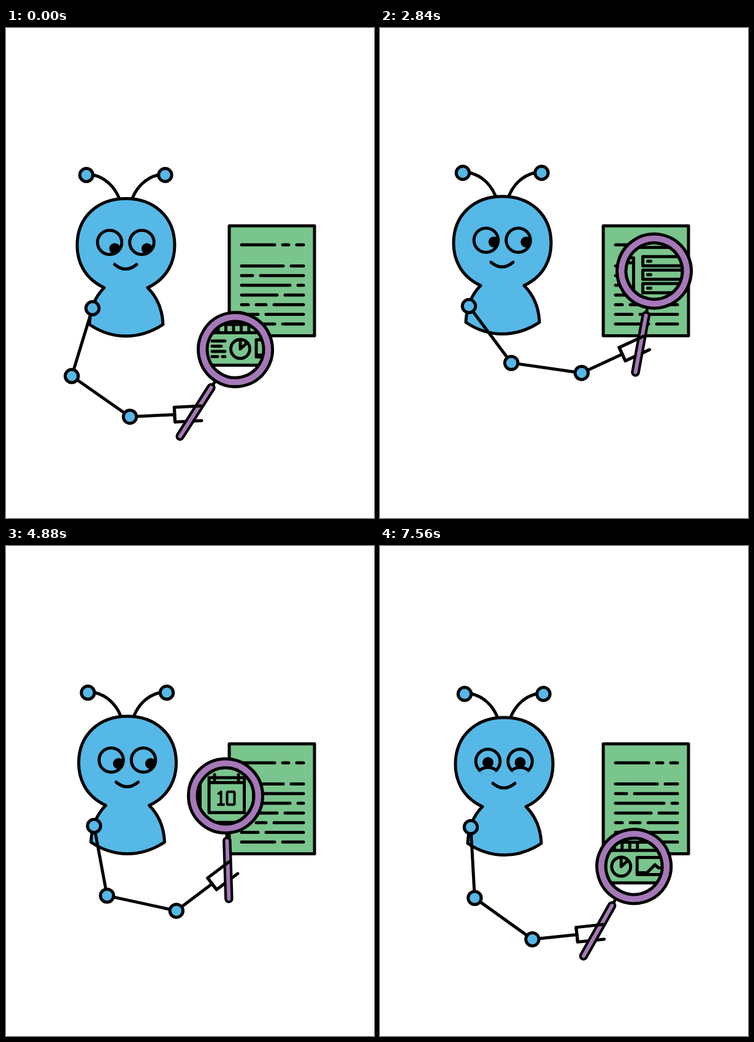
Recreate the animation shown at these times as an HTML page. Size 600 by 800 pixels, loop 7600 ms.

```html
<!DOCTYPE html>
<html lang="en">
<head>
<meta charset="utf-8">
<title>Reading with a magnifier</title>
<style>
  html, body { margin: 0; width: 100%; height: 100%; overflow: hidden; background: #fff; }
  svg { display: block; width: 100vw; height: 100vh; }
  .ink { fill: none; stroke: #000; stroke-width: 5; stroke-linecap: round; stroke-linejoin: round; }
  .blue { fill: #55b8e7; }
  .green { fill: #7ac58d; }
  .purple { stroke: #a678b9; }
  .dot { fill: #000; stroke: none; }
</style>
</head>
<body>
<svg viewBox="0 0 600 800">
  <defs>
    <clipPath id="lensClip"><circle id="lensHole" r="46"/></clipPath>
    <clipPath id="eyeClip"><circle r="22.4"/></clipPath>
  </defs>

  <g class="ink">
    <rect class="green" x="364" y="323" width="139" height="179.5"/>
    <path id="textLines"/>
  </g>

  <g id="body" class="ink">
    <path d="M184 277C177 260 163 245 143 240M206.500 277C213.500 260 227.500 245 247.500 240"/>
    <circle class="blue" cx="131" cy="240" r="10.700"/>
    <circle class="blue" cx="259.500" cy="240" r="10.700"/>
    <path class="blue" d="M160 424C126 408 116 379 116 355C116 308 150 278.500 195.500 278.500C241 278.500 275 308 275 355C275 379 265 408 231 424C246 439 255 460 256 484Q227 503 195.500 503Q164 503 136 484C137 460 145 439 160 424Z"/>
    <path d="M177 386Q195 401 213 386"/>
    <g class="eye" transform="translate(169 350)"></g>
    <g class="eye" transform="translate(221.500 350)"></g>
  </g>

  <g class="ink">
    <path id="arm"/>
    <circle id="shoulder" class="blue" r="10.700"/>
    <circle id="elbow" class="blue" r="10.700"/>
  </g>

  <circle id="lensBack" r="46" fill="#fff"/>
  <g clip-path="url(#lensClip)">
    <g id="details" class="ink">
      <rect class="green" x="321" y="346" width="163" height="204.500"/>
      <!-- profile card -->
      <path d="M335 356H473V394H335ZM370 356V394M387 375H458M346 379Q353 387 360 379"/>
      <circle class="dot" cx="349" cy="372" r="3.300"/>
      <circle class="dot" cx="357" cy="372" r="3.300"/>
      <!-- calendar -->
      <path d="M335.500 411H393V468H335.500ZM335.500 419H393M344.500 406V415M383.500 406V415"/>
      <path stroke-width="4" d="M351 437L355 434V455M350.500 455H359.500"/>
      <rect stroke-width="4" x="365" y="434" width="12" height="21" rx="2"/>
      <path id="servers"/>
      <path id="strip" d="M335 484H473M335 497.500H473"/>
      <!-- list, pie, chart -->
      <path d="M336 511H357M336 519.500H351M336 528H357M336 536.500H345M353 536.500H357"/>
      <circle cx="382" cy="524" r="15.500"/>
      <path d="M382 509V524L392 515"/>
      <path d="M408 509H473V537H408ZM409 534H424L437 521L443 526H460L471 515"/>
    </g>
  </g>

  <g id="glass" class="ink">
    <path class="hand" d="M-105.500 0H-32.500M-32.500 -12V12H11"/>
    <circle class="purple" r="53.200" stroke-width="10"/>
    <circle r="60.500"/>
    <circle r="46"/>
    <path d="M0 62V74"/>
    <path stroke-width="14.500" d="M0 73.500V168"/>
    <path class="purple" stroke-width="6" d="M0 73.500V168"/>
    <path class="hand" d="M-32.500 12V-12H11"/>
    <circle id="wrist" class="blue" r="10.700"/>
  </g>
</svg>

<script>
const LOOP = 7600;
const MOVE = 440, DRIFT = 0.04;                  // quick moves after a slow creep
const BONE = 115.8, GRIP = 124, REACH = 105.5, HAND_TILT = -35.3;
const PARALLAX = 0.28, GAZE = 13.2;
const $ = id => document.getElementById(id);
const all = name => document.querySelectorAll("." + name);
const rad = deg => deg * Math.PI / 180;
const mix = (a, b, u) => a + (b - a) * u;
const smooth = (from, to, t) => {
  const u = Math.min(1, Math.max(0, (t - from) / (to - from)));
  return u * u * (3 - 2 * u);
};

// Where the glass stops and how far the body leans there
const start = { x: 374, y: 525, tilt: 32.5, leanX: 0, leanY: 0 };
const stops = [
  { at: 0, ...start },
  { at: 400, ...start, x: 400 },
  { at: 800, ...start },
  { at: 1560, x: 444.5, y: 515, tilt: 33.3, leanX: 3, leanY: 0 },
  { at: 2280, x: 449.6, y: 399, tilt: 11, leanX: 4, leanY: -3.5 },
  { at: 3600, x: 348.5, y: 317, tilt: -10.1, leanX: 3, leanY: -4.5 },
  { at: 4600, x: 357.3, y: 406.6, tilt: -2.2, leanX: 2.5, leanY: -0.5 },
  { at: 6020, x: 419, y: 526, tilt: 30.5, leanX: 6.7, leanY: 1.2 },
  { at: LOOP, x: 414, y: 523, tilt: 29.3, leanX: 7, leanY: 1.5 }
];

function poseAt(t) {
  const i = stops.findIndex(s => s.at > t);
  const a = stops[i - 1], b = stops[i];
  const leave = Math.max(a.at, b.at - MOVE);
  const creep = leave > a.at ? DRIFT * Math.min(1, (t - a.at) / (leave - a.at)) : 0;
  const u = mix(creep, 1, smooth(leave, b.at, t));
  const pose = {};
  for (const key in start) pose[key] = mix(a[key], b[key], u);
  return pose;
}

// Rows of text are one ruled width broken by equal gaps
const gaps = [[438, 461], [452], [402], [463], [442], [395, 424], [411], [438]];
$("textLines").setAttribute("d", gaps.map((row, i) => {
  const y = i ? 372.7 + 15.8 * i : 354;
  return `M384 ${y}` + row.map(x => `H${x}M${x + 13} ${y}`).join("") + "H485";
}).join(""));

$("servers").setAttribute("d", [0, 1, 2].map(i => {
  const y = 409 + 22 * i;
  return `M408 ${y}H473V${y + 15}H408ZM416 ${y + 7.5}H421`;
}).join(""));

let strip = $("strip").getAttribute("d");
for (let x = 346; x < 410; x += 12.5) strip += `M${x} 484V497`;
$("strip").setAttribute("d", strip);

for (const eye of all("eye"))
  eye.innerHTML = `<circle class="blue" r="19.8"/>
    <g clip-path="url(#eyeClip)">
      <circle class="pupil dot" r="9"/>
      <circle class="lid blue" r="22"/>
    </g>`;

for (const hand of all("hand"))
  hand.setAttribute("transform", `translate(0 ${GRIP}) rotate(${HAND_TILT})`);

const wrist = {
  x: -REACH * Math.cos(rad(HAND_TILT)),
  y: GRIP - REACH * Math.sin(rad(HAND_TILT))
};

const move = (el, x, y) => el.setAttribute("transform", `translate(${x} ${y})`);
move($("wrist"), wrist.x, wrist.y);

function drawArm(sx, sy, wx, wy) {
  // Two equal bones: the elbow sits on the perpendicular at half way
  const dx = wx - sx, dy = wy - sy, d = Math.hypot(dx, dy);
  const bend = Math.sqrt(Math.max(0, BONE * BONE - d * d / 4)) / d;
  const ex = sx + dx / 2 - dy * bend, ey = sy + dy / 2 + dx * bend;
  $("arm").setAttribute("d", `M${sx} ${sy}L${ex} ${ey}L${wx} ${wy}`);
  move($("shoulder"), sx, sy);
  move($("elbow"), ex, ey);
}

function drawEyes(x, y, t) {
  // Look at the lens, then ahead with a smile
  const dx = x - 225, dy = y - 345, d = Math.hypot(dx, dy);
  const smile = smooth(6480, 6720, t);
  all("pupil").forEach(p => move(p, mix(GAZE * dx / d, 0, smile), mix(GAZE * dy / d, 2, smile)));
  all("lid").forEach(l => move(l, 0, mix(52, 32, smile)));
}

function draw(t) {
  const { x, y, tilt, leanX, leanY } = poseAt(t);
  const sin = Math.sin(rad(tilt)), cos = Math.cos(rad(tilt));

  move($("body"), leanX, leanY);
  drawEyes(x, y, t);
  move($("lensHole"), x, y);
  move($("lensBack"), x, y);
  move($("details"), PARALLAX * (x - start.x), PARALLAX * (y - start.y));
  $("glass").setAttribute("transform", `translate(${x} ${y}) rotate(${tilt})`);
  drawArm(141 + leanX, 457.5 + leanY,
    x + wrist.x * cos - wrist.y * sin, y + wrist.x * sin + wrist.y * cos);
}

const began = performance.now();
function tick() {
  draw((performance.now() - began) % LOOP);
  requestAnimationFrame(tick);
}
tick();
</script>
</body>
</html>
```
